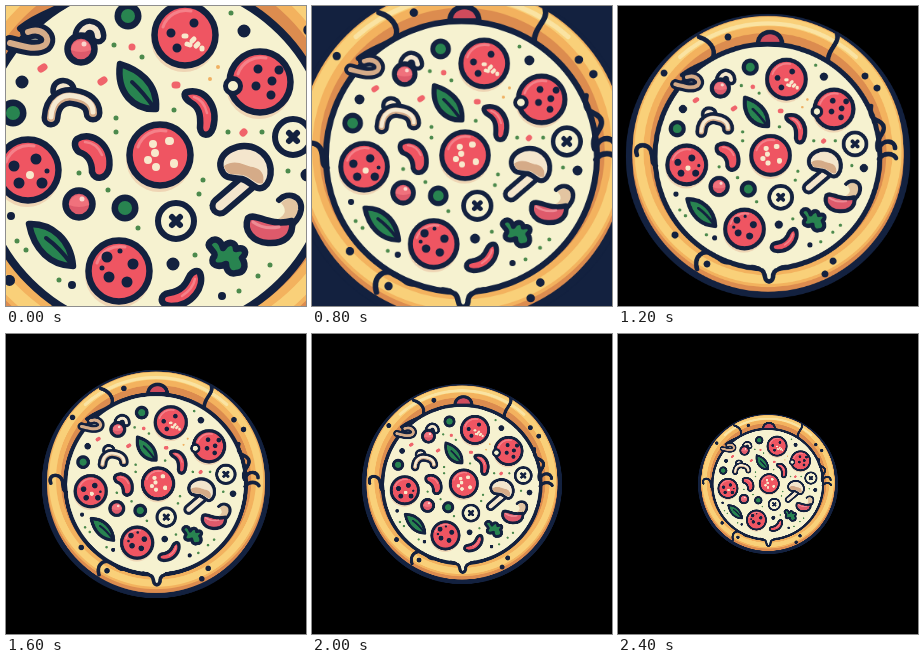
Write an HTML page that moves like this. It is 300x300 px and loops after 2800 ms.

```html
<!DOCTYPE html>
<html lang="en">
<head>
<meta charset="utf-8">
<title>Pizza</title>
<style>
  html, body { margin: 0; width: 100%; height: 100%; overflow: hidden; background: #000; }
  svg { display: block; width: 100vw; height: 100vh; animation: back 2.8s step-end infinite; }
  #pizza { transform-origin: 150px 150px; animation: shrink 2.8s step-end infinite; }
  @keyframes shrink {
    0% { transform: scale(1); }
    28.5714% { transform: scale(.765); }
    42.8571% { transform: scale(.635); }
    57.1429% { transform: scale(.51); }
    71.4286% { transform: scale(.447); }
    85.7143%, 100% { transform: scale(.313); }
  }
  @keyframes back {
    0% { background: #000; }
    28.5714% { background: #13213f; }
    42.8571%, 100% { background: #000; }
  }
  path, circle { stroke-linecap: round; stroke-linejoin: round; }
  .ink { stroke: #13213f; stroke-width: 6.5; }
  .line { fill: none; stroke: #13213f; }
  .red { fill: #ef5562; }
  .pink { fill: #de5a6b; }
  .green { fill: #288450; }
  .cream { fill: #f6f2d0; }
  .none { fill: none; }
</style>
</head>
<body>
<svg viewBox="0 0 300 300">
  <defs>
    <g id="pepperoni">
      <circle cx="-1" cy="4" r="33" fill="#efd5b4"/>
      <circle class="red ink" r="30.5"/>
      <path d="M-22 -8A24 24 0 0 1 6 -24" class="none" stroke="#f58189" stroke-width="3"/>
    </g>
    <g id="olive">
      <circle r="13.5" fill="#13213f"/>
      <circle class="green" r="7"/>
    </g>
    <g id="ring">
      <circle class="cream ink" r="18" style="stroke-width:6"/>
      <path d="M-4 -4L4 4M-4 4L4 -4" class="line" stroke-width="6"/>
    </g>
    <g id="ball">
      <circle class="pink ink" r="13.5"/>
      <path d="M-10 1A10 10 0 0 1 10 1Q0 5 -10 1Z" fill="#f0717c"/>
      <circle r="2.5" cx="3" cy="-5" fill="#fbd5cd"/>
    </g>
    <path id="slice" d="M45 112C46 94 58 89 68 91C81 93 87 99 87 107"/>
    <path id="curl" d="M22 26C36 21 46 32 39 39C30 45 16 40 4 37"/>
    <path id="loop" d="M75 29C78 18 91 18 92 30"/>
    <path id="stem" d="M242 176L214 200"/>
  </defs>

  <g id="pizza">
    <!-- crust -->
    <g transform="translate(150 150) scale(1.575) translate(-150 -150)">
      <circle cx="150" cy="150" r="139" fill="#dc8c4f" class="ink"/>
      <g class="none">
        <circle cx="150" cy="145.5" r="127" stroke="#f3b25e" stroke-width="17"/>
        <circle cx="150" cy="144.5" r="129" stroke="#f9d079" stroke-width="9"/>
        <path d="M62 51A132 132 0 0 1 238 51" stroke="#fae3a2" stroke-width="4"/>
      </g>
      <circle class="cream ink" cx="149.5" cy="150.5" r="112.5" style="stroke-width:5"/>
      <path class="ink" fill="#cf4b5c" style="stroke-width:4.5" d="M140 38C140 22 164 22 164 38Z"/>
      <path class="cream ink" style="stroke-width:4.5" d="M134 261C146 263 146 266 147 271C148 277 154 277 155 271C155 266 157 263 168 261"/>
      <path class="cream" d="M134 256H168L158 262H144Z"/>
      <g class="line" stroke-width="4.5">
        <path d="M81 31C91 34 98 42 95 51C91 57 78 58 64 69"/>
        <path d="M219 28C222 37 210 43 210 54"/>
        <path d="M19 149C15 139 27 136 32 143C36 149 32 156 38 160"/>
        <path d="M253 100C250 116 261 112 265 119C269 127 256 132 260 144"/>
        <path d="M261 142C266 132 277 135 277 142M261 153C266 146 275 147 278 152"/>
        <path d="M79 263C75 250 86 243 94 248C102 252 104 257 110 256"/>
      </g>
      <path class="line" stroke-width="7" d="M110 31h0M247 70h0M57 229h0M89 258h0M215 255h0M207 268h0M46 67h0M259 82h0"/>
    </g>

    <!-- crumbs -->
    <g class="none">
      <path stroke="#4c8a4c" stroke-width="5" d="M110 112h0M168 104h0M108 39h0M222 126h0M256 126h0M73 167h0M197 174h0M193 188h0M11 235h0M20 244h0M53 274h0M132 222h0M102 184h0M225 7h0M170 122h0M282 165h0M233 285h0M252 270h0M264 259h0M110 126h0M136 51h0M189 249h0"/>
      <path stroke="#f0646b" stroke-width="7" d="M35 63l3 -2M95 76l3 -2M126 41h0M237 127l1 -1M169 79l2 0"/>
      <path stroke="#f0b062" stroke-width="4" d="M204 73h0M212 61h0"/>
      <path class="line" stroke-width="13" d="M16 76h0M238 25h0M167 258h0M301 169h0"/>
      <path class="line" stroke-width="8" d="M5 210h0M216 290h0M66 279h0M3 273h0"/>
    </g>

    <use href="#pepperoni" x="179" y="29"/>
    <use href="#pepperoni" x="254" y="76"/>
    <use href="#pepperoni" x="22" y="164"/>
    <use href="#pepperoni" x="154" y="149"/>
    <use href="#pepperoni" x="113" y="265"/>
    <circle class="cream ink" cx="227" cy="80" r="7.5" style="stroke-width:5"/>
    <path class="line" stroke-width="9" d="M165 27h0M188 17h0M171 42h0M252 63h0M273 64h0M266 75h0M250 80h0M265 89h0"/>
    <path class="line" stroke-width="11" d="M8 160h0M30 153h0M13 177h0M36 177h0M101 251h0M127 258h0M103 271h0M121 276h0"/>
    <path class="line" stroke-width="5" d="M41 165h0M96 262h0M114 245h0"/>
    <path class="none" stroke="#f8e9cc" stroke-width="8" d="M147 138h0M163 135l1 0M142 154h0M149 147h0M150 161h0M168 157l0 1M24 169h0"/>
    <path class="none" stroke="#f8e9cc" stroke-width="5" d="M178 30l2 0M186 35l2 -2M181 38l3 1M190 40l2 -2M196 42l0 1"/>

    <use href="#olive" x="122" y="10"/>
    <use href="#olive" x="7" y="107"/>
    <use href="#olive" x="119" y="202"/>
    <use href="#ring" x="170" y="215"/>
    <use href="#ring" x="287" y="131"/>

    <!-- leaves -->
    <path class="green ink" d="M114 58C131 63 152 76 150 103C128 104 110 87 114 58Z"/>
    <path class="line" stroke-width="4" d="M126 76Q137 86 149 103"/>
    <path class="green ink" d="M23 218C46 217 65 234 67 260C45 260 28 244 23 218Z"/>
    <path class="line" stroke-width="4" d="M40 232Q54 242 66 259"/>

    <!-- peppers -->
    <g class="red ink">
      <path d="M181 86C199 81 213 101 207 122C204 131 195 131 194 122C195 108 193 101 184 96C178 92 177 87 181 86Z"/>
      <path d="M71 133C86 124 107 139 103 163C100 173 89 175 86 166C86 155 82 149 73 146C68 142 68 136 71 133Z"/>
      <path d="M194 267C199 280 187 300 165 300C152 299 154 288 163 287C176 285 180 278 183 271C187 264 192 264 194 267Z"/>
    </g>
    <path class="none" stroke="#f58189" stroke-width="2.5" d="M188 91Q198 94 201 107M79 136Q91 137 96 149M189 273Q187 283 176 290"/>

    <!-- mushrooms -->
    <g class="none">
      <use href="#stem" stroke="#13213f" stroke-width="21"/>
      <use href="#stem" stroke="#f4e6cd" stroke-width="9"/>
      <path class="ink" fill="#f4e6cd" d="M215 163C210 146 235 134 251 143C269 153 267 174 258 181C250 186 244 175 236 173C226 171 219 174 215 163Z"/>
      <path fill="#d5ab88" d="M218 160C230 152 238 160 247 161C255 163 259 168 257 177C250 180 246 171 236 169C226 168 221 170 218 160Z"/>
      <path class="ink" fill="#f4e6cd" d="M47 86C46 71 67 71 68 84" style="stroke-width:5.5"/>
      <use href="#slice" stroke="#13213f" stroke-width="19"/>
      <use href="#slice" stroke="#d5ab88" stroke-width="8"/>
      <use href="#slice" y="-1" stroke="#f6ead2" stroke-width="5"/>
      <use href="#curl" stroke="#13213f" stroke-width="16"/>
      <use href="#curl" stroke="#d5ab88" stroke-width="6"/>
      <use href="#loop" stroke="#13213f" stroke-width="17"/>
      <use href="#loop" stroke="#f4e6cd" stroke-width="6"/>
    </g>
    <use href="#ball" x="75" y="43"/>
    <use href="#ball" x="73" y="198"/>

    <!-- radish -->
    <path fill="#e3c5a1" d="M275 197C284 188 296 194 295 204C292 212 282 217 272 213Q284 206 275 197Z"/>
    <path class="line" stroke-width="6" d="M273 194C282 185 297 190 295 204C294 210 291 214 287 218"/>
    <path class="pink ink" d="M242 212C250 206 262 221 286 215C288 229 279 238 262 237C247 236 237 225 242 212Z"/>
    <path class="none" stroke="#ee8b95" stroke-width="3" d="M247 216Q258 224 273 221"/>

    <!-- herb -->
    <path class="green ink" d="M204 236C209 231 215 234 217 242C222 234 230 236 230 243C239 240 242 247 236 252C241 260 238 267 230 267C224 269 220 264 220 258C212 262 204 259 207 252C211 248 207 246 205 243C202 240 202 238 204 236Z"/>
  </g>
</svg>
</body>
</html>
```
